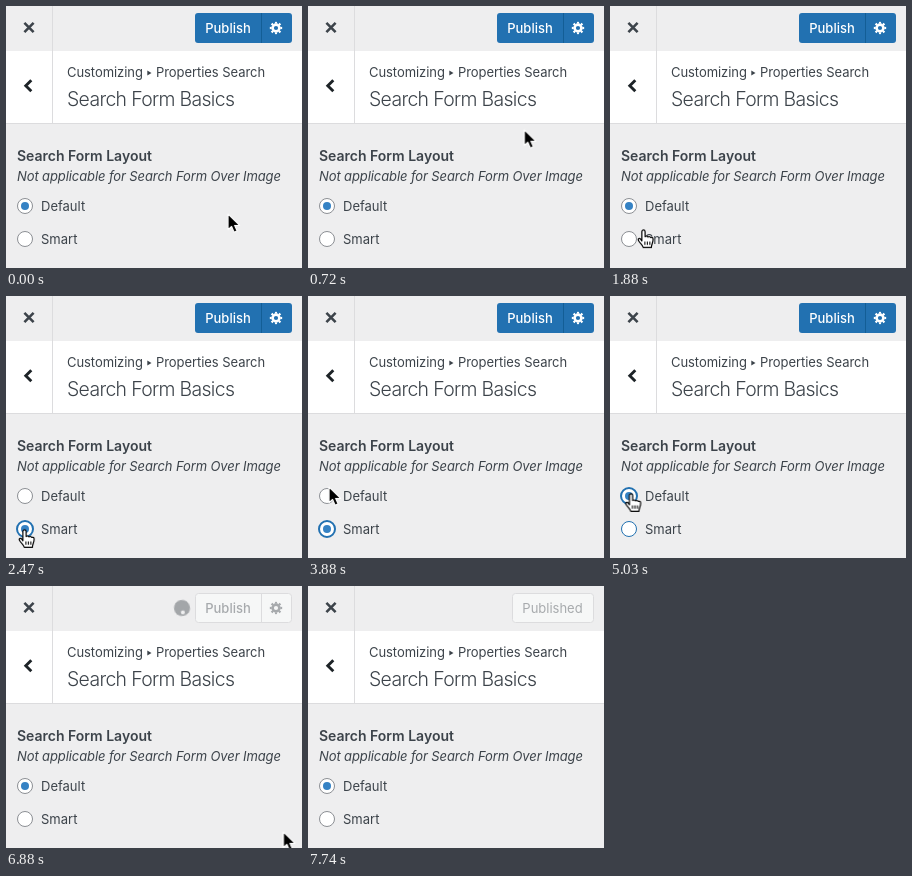
An HTML page for the animation above (8.25 s loop, 296 by 262 pixels).

```html
<!DOCTYPE html>
<html lang="en">
<head>
<meta charset="utf-8">
<title>Search form settings</title>
<style>
  html, body { margin: 0; width: 100%; height: 100%; overflow: hidden; background: #eeeeef; }
  svg { display: block; width: 296px; height: 262px; }
  text { font-family: Inter, "Open Sans", sans-serif; font-size: 13px; fill: #3c434a; }
  .crumb { letter-spacing: -.06px; }
  .title { font-size: 19.4px; font-weight: 300; letter-spacing: -.65px; }
  .heading { font-size: 14px; font-weight: 600; }
  .note { font-style: italic; letter-spacing: -.1px; }
  .button { text-anchor: middle; fill: #a7aaad; }
  .publish { font-weight: 500; }
  .ring { fill: #fff; stroke: #8c8f94; }
  .dot { fill: #3582c4; }

  /* One loop is 8250 ms: 1% = 82.5 ms */
  .anim, .anim * { animation: 8.25s step-end infinite; }
  #cursor { animation-name: travel; }
  #arrow { animation-name: arrow; }
  #hand { animation-name: hand; }
  #default .ring { animation-name: focus-default; }
  #smart .ring { animation-name: focus-smart; }
  #default .dot { animation-name: pick-default; }
  #smart .dot { animation-name: pick-smart; }
  #publish { animation-name: publish; }
  #hover { animation-name: hover; }
  #focus { animation-name: press; }
  #saving { animation-name: saving; }
  #published { animation-name: published; }
  #spinner { animation: spin .6s linear infinite; }

  @keyframes travel {
    0%, 6.18% { transform: translate(222px, 208px); animation-timing-function: ease-in; }
    7.64% { transform: translate(209px, 163px); animation-timing-function: ease-out; }
    9.09%, 16.73% { transform: translate(217px, 120px); animation-timing-function: ease-in; }
    18.42% { transform: translate(147px, 161px); animation-timing-function: linear; }
    20.6% { transform: translate(52px, 212px); animation-timing-function: ease-out; }
    26.3%, 35.76% { transform: translate(18.5px, 234px); animation-timing-function: ease-in-out; }
    38.55%, 45.45% { transform: translate(27px, 190px); animation-timing-function: ease-in-out; }
    47.03%, 54.18% { transform: translate(21px, 191px); animation-timing-function: ease-in-out; }
    55.88%, 64.24% { transform: translate(21px, 198px); animation-timing-function: ease-in-out; }
    70.79%, 76.5% { transform: translate(223px, 12px); animation-timing-function: ease-in-out; }
    85.1%, 100% { transform: translate(282px, 266px); }
  }
  @keyframes arrow {
    0%, 37%, 65.2% { visibility: visible; }
    22.5%, 55% { visibility: hidden; }
  }
  @keyframes hand {
    0%, 37%, 65.2% { visibility: hidden; }
    22.5%, 55% { visibility: visible; }
  }
  @keyframes focus-default {
    0%, 75.76% { stroke: #8c8f94; stroke-width: 1px; r: 7.5px; }
    60.96% { stroke: #2271b1; stroke-width: 2px; r: 8px; }
  }
  @keyframes focus-smart {
    0%, 61.33% { stroke: #8c8f94; stroke-width: 1px; r: 7.5px; }
    29.21% { stroke: #2271b1; stroke-width: 2px; r: 8px; }
    60.96% { stroke: #2271b1; stroke-width: 1px; r: 7.5px; }
  }
  @keyframes pick-default {
    0%, 60.96% { opacity: 1; }
    29.58% { opacity: 0; }
  }
  @keyframes pick-smart {
    0%, 60.96% { opacity: 0; }
    29.58% { opacity: 1; }
  }
  @keyframes publish { 0% { opacity: 1; } 77%, 100% { opacity: 0; } }
  @keyframes hover { 0% { opacity: 0; } 70%, 100% { opacity: 1; } }
  @keyframes press { 0% { opacity: 0; } 75.76%, 100% { opacity: 1; } }
  @keyframes saving { 0%, 93.81% { opacity: 0; } 77% { opacity: 1; } }
  @keyframes published { 0% { opacity: 0; } 93.81%, 100% { opacity: 1; } }
  @keyframes spin { to { transform: rotate(360deg); } }
</style>
</head>
<body>
<svg viewBox="0 0 296 262">
  <defs>
    <g id="gear" fill="none" stroke="currentColor">
      <circle r="3.4" stroke-width="2.6"/>
      <circle r="5.2" stroke-width="2" pathLength="16" stroke-dasharray="1" stroke-dashoffset=".5"/>
    </g>
  </defs>

  <path fill="#fff" d="M0 45h296v72H0z"/>
  <path fill="none" stroke="#dcdcde" d="M0 117.5h296M46.5 0v117"/>
  <path fill="none" stroke="#3c434a" stroke-width="2.6" d="M18.4 16.9l9.2 9.2m0-9.2l-9.2 9.2"/>
  <path fill="none" stroke="#1d2327" stroke-width="2.9" d="M25.3 74.3l-5.5 5.5 5.5 5.5"/>

  <text class="crumb" x="61" y="71">Customizing</text>
  <path fill="#3c434a" d="M141.3 64.6l4.2 2.4-4.2 2.4z"/>
  <text class="crumb" x="150" y="71">Properties Search</text>
  <text class="title" x="61" y="99.5">Search Form Basics</text>
  <text class="heading" x="11" y="155">Search Form Layout</text>
  <text class="note" x="11" y="174.5">Not applicable for Search Form Over Image</text>
  <text x="35" y="205">Default</text>
  <text x="35" y="238">Smart</text>

  <g class="anim">
    <g id="default" transform="translate(19 200)">
      <circle class="ring" r="7.5"/><circle class="dot" r="4"/>
    </g>
    <g id="smart" transform="translate(19 233)">
      <circle class="ring" r="7.5"/><circle class="dot" r="4"/>
    </g>

    <g id="publish">
      <rect x="189" y="7" width="97" height="30" rx="3" fill="#2271b1"/>
      <path id="hover" fill="#135e96" d="M192 7h63v30h-63a3 3 0 0 1-3-3V10a3 3 0 0 1 3-3z"/>
      <rect id="focus" x="187.5" y="5.5" width="69" height="33" rx="4" fill="none" stroke="#2271b1"/>
      <path stroke="#135e96" d="M255.5 7v30"/>
      <text class="button publish" x="222" y="27" style="fill:#fff">Publish</text>
      <use href="#gear" x="270" y="22" color="#fff"/>
    </g>

    <g id="saving">
      <rect x="189.5" y="7.5" width="96" height="29" rx="3" fill="#f6f7f7" stroke="#dcdcde"/>
      <path stroke="#dcdcde" d="M255.5 7v30"/>
      <text class="button publish" x="222" y="27">Publish</text>
      <use href="#gear" x="270" y="22" color="#a7aaad"/>
      <g transform="translate(176 22)">
        <g id="spinner">
          <circle r="8" fill="#a3a6a9"/><circle cy="-4.5" r="2" fill="#f0f0f1"/>
        </g>
      </g>
    </g>

    <g id="published">
      <rect x="204.5" y="7.5" width="81" height="29" rx="3" fill="#f6f7f7" stroke="#dcdcde"/>
      <text class="button" x="244.5" y="27">Published</text>
    </g>

    <g id="cursor" stroke="#fff" stroke-linejoin="round">
      <path id="arrow" transform="scale(1.08)" d="M0 0v14.5l3.3-3 2.3 5.4 2.8-1.2-2.3-5.2h4.6z"/>
      <g id="hand" transform="scale(1.08)">
        <path fill="#fff" stroke="#000" stroke-width="1.1" d="M-1.5 10V1.3a1.5 1.5 0 0 1 3 0V6q1.3-1.2 2.6.3 1.5-.9 2.5.5 2.3-.6 2.3 1.7c0 3-1.4 4.2-1.6 7.5H-.2c-.6-2.6-2.7-3.5-4.4-6.4-.9-1.6 1-2.6 2-1.2z"/>
        <path fill="none" stroke="#000" d="M1.3 10.5v3m2.3-3v3m2.3-3v3"/>
      </g>
    </g>
  </g>
</svg>
</body>
</html>
```
